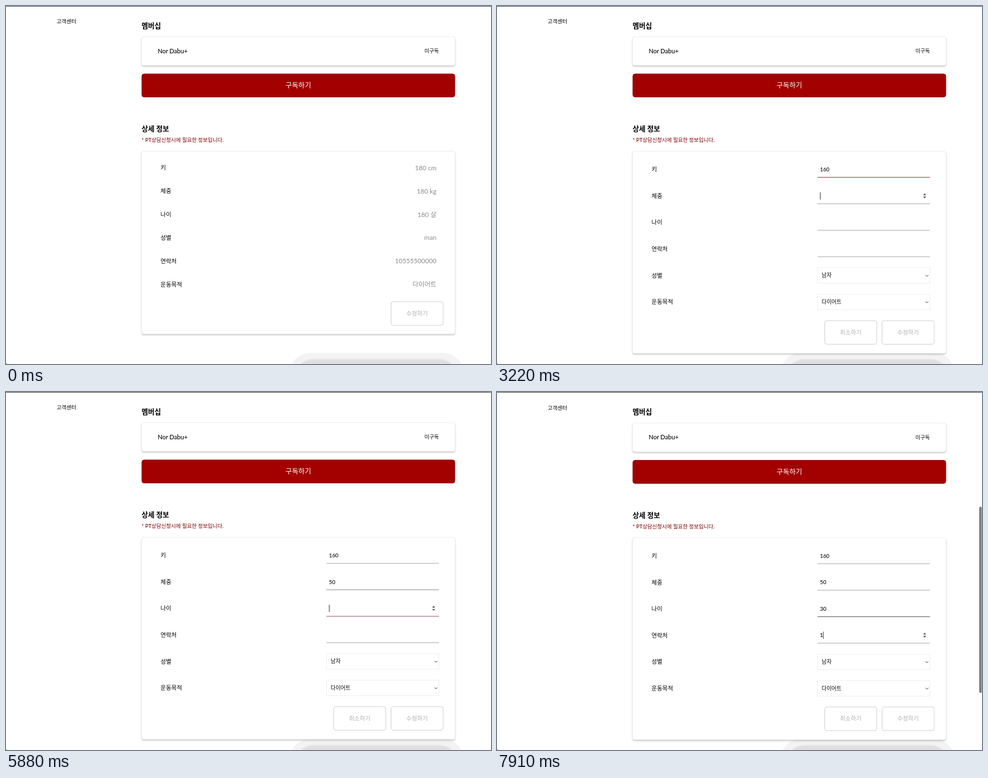
These frames come from a looping animation (871x643 px, 8000 ms). An HTML page:

```html
<!DOCTYPE html>
<html lang="ko">
<head>
<meta charset="utf-8">
<title>상세 정보</title>
<style>
  html, body { margin: 0; width: 100%; height: 100%; overflow: hidden; background: #fff; }
  svg { display: block; }
  text { font-family: Lato, "Noto Sans CJK KR", "Noto Sans CJK", sans-serif; font-weight: 500; white-space: pre; }
</style>
</head>
<body>
<svg id="stage" width="871" height="643" viewBox="0 0 871 643">
  <defs>
    <filter id="shadow" x="-5%" y="-20%" width="110%" height="150%">
      <feDropShadow dx="0" dy="2" stdDeviation="1.6" flood-color="#000" flood-opacity=".24"/>
    </filter>
    <filter id="soft" x="-5%" y="-20%" width="110%" height="140%">
      <feGaussianBlur stdDeviation=".8"/>
    </filter>
  </defs>
</svg>
<script>
const LOOP = 8000, STEP = 70;
const GREY = [190, 190, 190];
const stage = document.getElementById('stage');

function add(parent, tag, attrs, content) {
  const el = document.createElementNS('http://www.w3.org/2000/svg', tag);
  for (const k in attrs) el.setAttribute(k, attrs[k]);
  if (content) el.textContent = content;
  parent.appendChild(el);
  return el;
}

// cy is the vertical middle of the glyphs
function label(parent, x, cy, size, content, attrs) {
  return add(parent, 'text', { x, y: cy + size * 0.37, 'font-size': size, ...attrs }, content);
}

function box(parent, x, y, width, height, attrs) {
  return add(parent, 'rect', { x, y, width, height, ...attrs });
}

function card(parent, y, height) {
  box(parent, 243.5, y, 563, height, { rx: 4, fill: '#fff', filter: 'url(#shadow)' });
  box(parent, 243.5, y, 563, height, { rx: 4, fill: 'none', stroke: '#ececec' });
}

function button(parent, x, y, content) {
  box(parent, x, y, 93.5, 42.5, { rx: 4, fill: '#fff', stroke: '#cfcfcf' });
  label(parent, x + 46.75, y + 20.8, 10.5, content, { fill: '#b0b0b0', 'text-anchor': 'middle' });
}

// Fixed backdrop
box(stage, 508.5, 623, 314, 90, { rx: 38, fill: '#f3f3f3' });
box(stage, 521, 634.5, 288, 70, { rx: 30, fill: '#dfdfdf', filter: 'url(#soft)' });

const page = add(stage, 'g', {});
label(page, 91, 27.3, 9.5, '고객센터');
label(page, 243.5, 35, 12.6, '멤버십', { 'font-weight': 700, style: 'font-weight:700' });
card(page, 55, 51.5);
label(page, 272.5, 80.5, 11, 'Nor Dabu+');
label(page, 777.5, 80.5, 9.4, '미구독', { 'text-anchor': 'end' });
box(page, 244, 122, 562, 41.5, { rx: 4, fill: '#a30000', stroke: '#8c0000' });
label(page, 525, 142.3, 12.5, '구독하기', { fill: '#fff', 'text-anchor': 'middle' });
label(page, 243.5, 220.5, 12.6, '상세 정보', { style: 'font-weight:700' });
label(page, 243.5, 240.7, 9.5, '* PT상담신청시에 필요한 정보입니다.', { fill: '#7d0000' });

// Read-only view
const view = add(page, 'g', {});
card(view, 261, 328);
[['키', '180 cm'], ['체중', '180 kg'], ['나이', '180 살'], ['성별', 'man'],
 ['연락처', '10555500000'], ['운동목적', '다이어트']].forEach(([name, value], i) => {
  const y = 290.5 + i * 41.85;
  label(view, 277.5, y, 10.5, name);
  label(view, 773, y, 11.7, value, { fill: '#8c8c8c', 'text-anchor': 'end', style: 'font-weight:400' });
});
button(view, 691.5, 531, '수정하기');

// Edit form
const form = add(page, 'g', {});
card(form, 261, 362.8);
const rowY = i => 293.5 + i * 47.55;
['키', '체중', '나이', '연락처', '성별', '운동목적'].forEach((name, i) =>
  label(form, 277.5, rowY(i), 10.5, name));

const fields = [0, 1, 2, 3].map(i => {
  const y = rowY(i);
  const line = box(form, 575.5, y + 13.5, 202, 1.4, {});
  const value = label(form, 580, y, 9.75, '');
  const spin = add(form, 'g', { transform: `translate(768 ${y})` });
  box(spin, -3.5, -5, 7, 10, { fill: '#efefef' });
  add(spin, 'path', { d: 'M-2.5-1.5L0-4L2.5-1.5ZM-2.5 1.5L0 4L2.5 1.5Z', fill: '#3c3c3c' });
  return { line, value, spin };
});
['남자', '다이어트'].forEach((value, i) => {
  const y = rowY(4 + i);
  box(form, 575.5, y - 13.7, 202, 28, { fill: '#fff', stroke: '#eee' });
  label(form, 583, y, 9.7, value);
  add(form, 'path', { d: `M769.7 ${y - 0.6}l2.5 2.5l2.5-2.5`, fill: 'none', stroke: '#333' });
});
button(form, 588.5, 565, '취소하기');
button(form, 691.5, 565, '수정하기');
const caret = box(form, 580, 0, 1, 13, { fill: '#333' });

// Fixed window parts
box(stage, 0, 0, 871, 1, { fill: '#484848' });
add(stage, 'path', { d: 'M0 640.5Q.3 642.5 2 643H0Z', fill: '#777' });
const bar = box(stage, 866, 206, 4.5, 334.5, { rx: 2.2, fill: '#7d7d7d' });

// [time, field, text, caret shown]
const typing = [
  [1120, 0, '', 1], [1680, 0, '', 0], [1960, 0, '1', 1], [2240, 0, '16', 1],
  [2310, 0, '160', 1], [2870, 0, '160', 0],
  [3220, 1, '', 1], [3780, 1, '', 0], [4270, 1, '', 1], [4690, 1, '5', 1],
  [4830, 1, '50', 1], [5390, 1, '50', 0],
  [5740, 2, '', 1], [6230, 2, '', 0], [6790, 2, '', 1], [6860, 2, '3', 1],
  [6930, 2, '30', 1], [7490, 2, '30', 0],
  [7840, 3, '', 1], [7910, 3, '1', 1]
];
// [time, hovered field]
const hover = [[700, 1], [980, -1], [1050, 0], [2870, 1], [5390, 2], [7560, -1], [7630, 3]];
// [field, start, end, from, to]
const RED = [176, 88, 92], DARK = [130, 128, 128], ROSE = [160, 108, 114];
const fades = [
  [0, 1190, 1400, GREY, RED], [0, 3220, 3500, RED, GREY],
  [1, 3220, 3500, GREY, DARK], [1, 5740, 5950, DARK, GREY],
  [2, 5740, 5950, GREY, ROSE], [2, 7770, 7910, ROSE, [122, 122, 122]]
];

const show = (el, on) => el.setAttribute('visibility', on ? 'inherit' : 'hidden');

function draw(ms) {
  const t = Math.floor(ms / STEP) * STEP;
  const editing = t >= 350, scrolled = t >= 7840;
  show(view, !editing);
  show(form, editing);
  show(bar, scrolled);
  page.setAttribute('transform', `translate(0 ${scrolled ? 0.7 : 0})`);

  const texts = ['', '', '', ''];
  const colors = texts.map(() => GREY);
  let focus = null, over = -1;
  for (const e of typing) if (t >= e[0]) { focus = e; texts[e[1]] = e[2]; }
  for (const [at, i] of hover) if (t >= at) over = i;
  for (const [i, start, end, from, to] of fades) {
    if (t < start) continue;
    const k = Math.min(1, (t - start) / (end - start));
    colors[i] = from.map((c, n) => Math.round(c + (to[n] - c) * k));
  }
  fields.forEach((f, i) => {
    f.value.textContent = texts[i];
    f.line.setAttribute('fill', `rgb(${colors[i]})`);
    show(f.spin, editing && i === over);
  });
  show(caret, editing && focus && focus[3]);
  if (focus) {
    caret.setAttribute('x', 580 + focus[2].length * 5.66);
    caret.setAttribute('y', rowY(focus[1]) - 6.5);
  }
}

const began = performance.now();
function tick() {
  draw((performance.now() - began) % LOOP);
  requestAnimationFrame(tick);
}
tick();
</script>
</body>
</html>
```
